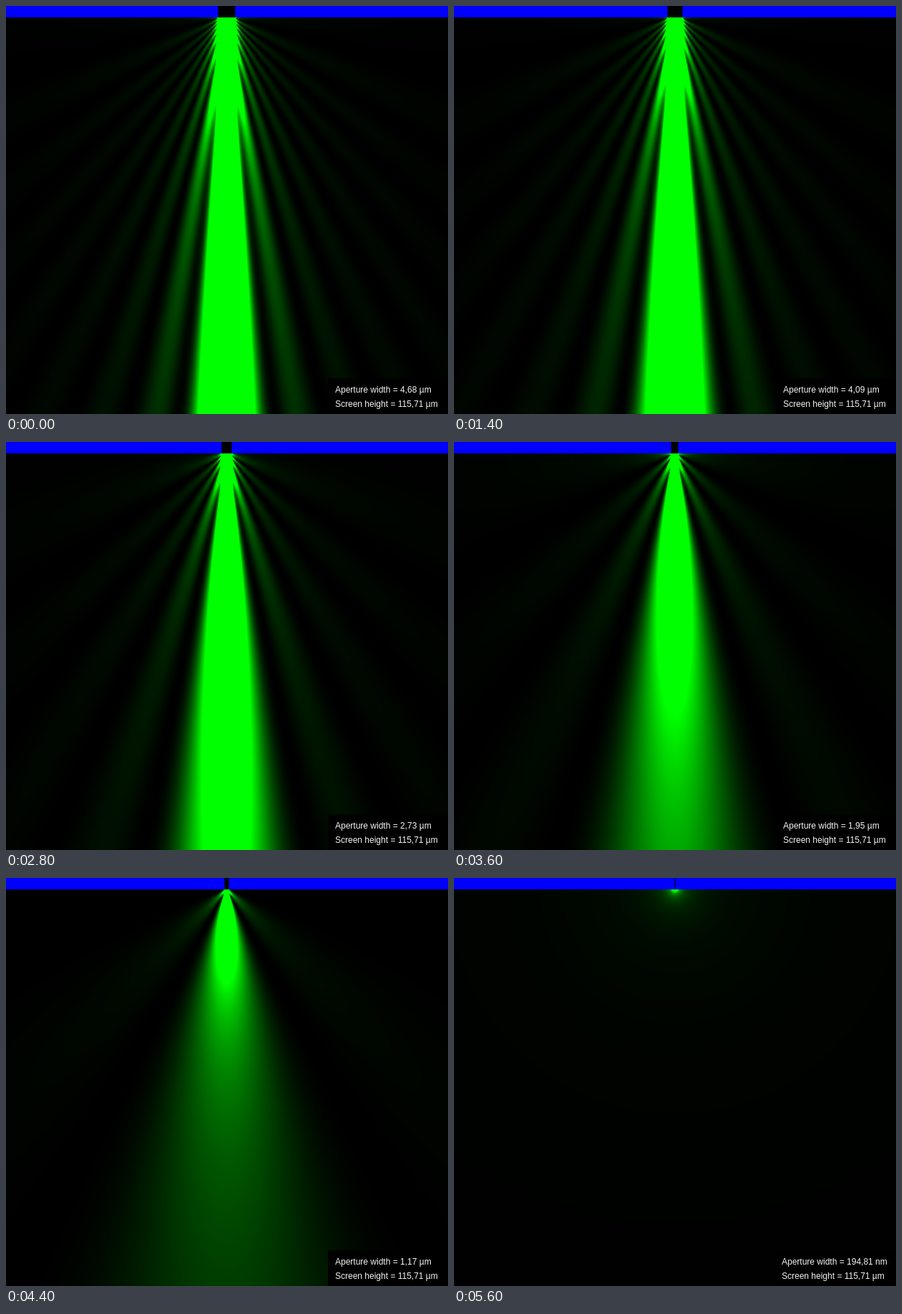
These frames come from a looping animation (619 px wide and 572 px high, 7.6 s). An HTML page with a canvas:

```html
<!DOCTYPE html>
<html lang="en">
<head>
<meta charset="utf-8">
<title>Single slit diffraction</title>
<style>
  html, body { margin: 0; width: 100%; height: 100%; overflow: hidden; background: #000; }
  canvas { position: absolute; left: 0; top: 0; }
  #label {
    position: absolute; left: 451px; top: 522px; right: 0; height: 50px;
    box-sizing: border-box; padding: 6px 0 0 10px; background: #000; color: #f4f4f4;
    font: 12px/20px "Liberation Sans", Arial, sans-serif; white-space: pre;
  }
  #stage { position: relative; width: 619px; height: 572px; overflow: hidden; }
</style>
</head>
<body>
<div id="stage">
  <canvas id="view" width="619" height="572"></canvas>
  <div id="label"></div>
</div>
<script>
const W = 619, H = 572, WALL = 16, CENTER = 309;
const LOOP = 7600, FIRST_HOLD = 1000, STEP = 200, MAX_SLIT = 24;
const PIXEL_NM = 194.81, WAVELENGTH = 2.9, GAIN = 945;

const ctx = document.getElementById('view').getContext('2d');
const label = document.getElementById('label');
const rows = H - WALL;
const image = ctx.createImageData(W, rows);
for (let i = 3; i < image.data.length; i += 4) image.data[i] = 255;

// Running sums of one point source's wave along x: any slit is then a difference of two entries.
const REACH = CENTER + MAX_SLIT, SPAN = 2 * REACH + 1;
const sumRe = new Float64Array(rows * (SPAN + 1));
const sumIm = new Float64Array(rows * (SPAN + 1));
for (let y = 0; y < rows; y++) {
  let at = y * (SPAN + 1);
  for (let dx = -REACH; dx <= REACH; dx++, at++) {
    const r = Math.hypot(dx, y + 1);
    const phase = 2 * Math.PI * r / WAVELENGTH;
    const amplitude = Math.sqrt(GAIN / r);
    sumRe[at + 1] = sumRe[at] + amplitude * Math.cos(phase);
    sumIm[at + 1] = sumIm[at] + amplitude * Math.sin(phase);
  }
}

function drawField(slit, left) {
  for (let y = 0; y < rows; y++) {
    const base = y * (SPAN + 1) + REACH - left + 1;
    for (let x = 0; x < W; x++) {
      const hi = base + x, lo = hi - slit;
      const re = sumRe[hi] - sumRe[lo], im = sumIm[hi] - sumIm[lo];
      image.data[(y * W + x) * 4 + 1] = Math.min(255, Math.floor(re * re + im * im));
    }
  }
  ctx.putImageData(image, 0, WALL);
}

function drawWall(slit, left) {
  ctx.fillStyle = '#00f';
  ctx.fillRect(0, 0, W, WALL);
  ctx.fillStyle = '#000';
  ctx.fillRect(left, 0, slit, WALL);
}

function drawLabel(slit) {
  const nm = slit * PIXEL_NM, small = nm < 1000;
  const value = (small ? nm : nm / 1000).toFixed(2).replace('.', ',');
  label.style.left = (small ? 449 : 451) + 'px';
  label.textContent =
    `Aperture width = ${value} ${small ? 'nm' : 'µm'}\nScreen height = 115,71 µm`;
}

let shown = 0;
function render(t) {
  const step = t < FIRST_HOLD ? 0 : 1 + Math.floor((t - FIRST_HOLD) / STEP);
  const slit = Math.max(1, MAX_SLIT - step);
  if (slit === shown) return;
  shown = slit;
  const left = CENTER - Math.floor(slit / 2);
  drawField(slit, left);
  drawWall(slit, left);
  drawLabel(slit);
}

const start = performance.now();
function tick() {
  render((performance.now() - start) % LOOP);
  requestAnimationFrame(tick);
}
tick();
</script>
</body>
</html>
```
